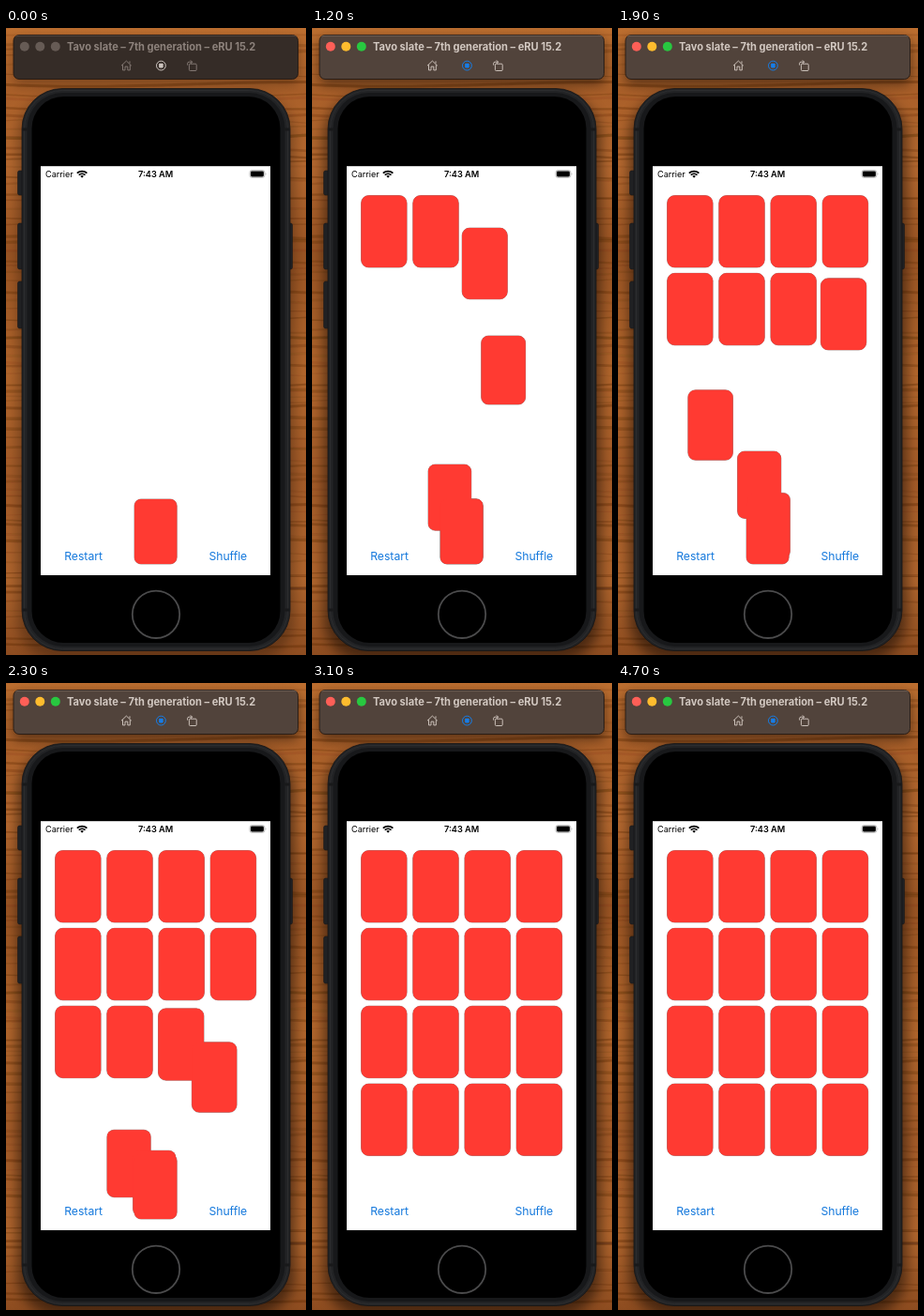
Animation, 320 px wide and 668 px high, one loop 4.8 s. Source, as an HTML page:

```html
<!DOCTYPE html>
<html lang="en">
<head>
<meta charset="utf-8">
<title>Card dealing</title>
<style>
  html, body { margin: 0; width: 100%; height: 100%; overflow: hidden; background: #a65d29; }
  svg { display: block; width: 100%; height: 100%; }
  text { font-family: Inter, "Liberation Sans", sans-serif; }
  #bar { --bg: #51433b; --edge: #776960; --ink: #d2c8c1; --icon: #d8cec7; --rec: #167de8;
         --red: #fe5f57; --amber: #febc2e; --green: #28c840; }
  #bar.idle { --bg: #352c27; --edge: #5c504a; --ink: #8d827c; --icon: #8c817b; --rec: #cdc5c0;
              --red: #665b55; --amber: #665b55; --green: #665b55; }
</style>
</head>
<body>
<svg viewBox="0 0 320 668" preserveAspectRatio="none">
  <defs>
    <linearGradient id="wood" x2="0" y2="1">
      <stop offset="0" stop-color="#bd6f30"/>
      <stop offset=".1" stop-color="#a95f29"/>
      <stop offset=".22" stop-color="#b4682f"/>
      <stop offset=".36" stop-color="#9a5423"/>
      <stop offset=".55" stop-color="#b2662c"/>
      <stop offset=".72" stop-color="#a45b28"/>
      <stop offset=".88" stop-color="#b0652d"/>
      <stop offset="1" stop-color="#8d4c20"/>
    </linearGradient>
    <filter id="blur" x="-20%" y="-20%" width="140%" height="140%"><feGaussianBlur stdDeviation="7"/></filter>
    <filter id="soft"><feGaussianBlur stdDeviation="1.2 .7"/></filter>
  </defs>

  <rect width="320" height="668" fill="url(#wood)"/>
  <g id="grain" fill="none" stroke="#5f2d0d" filter="url(#soft)"/>
  <g id="shade" filter="url(#blur)">
    <rect x="12" y="72" width="296" height="602" rx="44"/>
    <rect x="8" y="12" width="304" height="48" rx="6"/>
  </g>

  <!-- phone -->
  <g fill="#202123" stroke="#18191a" stroke-width=".6">
    <rect x="12.5" y="152" width="8" height="26" rx="2"/>
    <rect x="12.5" y="208" width="8" height="49" rx="2"/>
    <rect x="12.5" y="270" width="8" height="50" rx="2"/>
    <rect x="298" y="208" width="7.5" height="49" rx="2"/>
  </g>
  <rect x="17" y="64.5" width="286" height="599" rx="43" fill="#222325" stroke="#161617" stroke-width=".8"/>
  <rect x="19.5" y="66.5" width="281" height="595" rx="41" fill="none" stroke="#2c2d2f"/>
  <rect x="22.5" y="69" width="275" height="590" rx="38" fill="#17181a"/>
  <rect x="27.5" y="73" width="265" height="582" rx="34"/>
  <path d="M17.5 108h5M297.5 108h5M17.5 620h5M297.5 620h5" stroke="#18191a" stroke-width="3"/>
  <circle cx="160" cy="624.8" r="25.2" fill="none" stroke="#4b4b4c" stroke-width="1.8"/>

  <!-- screen -->
  <rect x="37" y="147.2" width="245" height="435.8" fill="#fff"/>
  <text x="42" y="159" font-size="9.1">Carrier</text>
  <text x="159.6" y="159" font-size="9.2" font-weight="600" text-anchor="middle">7:43 AM</text>
  <g fill="none" stroke="#000" stroke-width="1.7">
    <path d="M75.8 154.7a7.6 7.6 0 0 1 10.6 0M77.7 156.7a4.9 4.9 0 0 1 6.8 0"/>
    <path d="M81.1 159.7l-1.8-1.9a2.6 2.6 0 0 1 3.6 0z" fill="#000" stroke="none"/>
  </g>
  <rect x="260" y="151.7" width="15.8" height="7.6" rx="2.2" fill="none" stroke="#999" stroke-width=".7"/>
  <rect x="260.9" y="152.6" width="14" height="5.8" rx="1.4"/>
  <path d="M276.8 154.2q1.4 1.3 0 2.6z" fill="#999"/>
  <g font-size="12.2" fill="#1478dc" text-anchor="middle">
    <text x="82.6" y="567.2">Restart</text>
    <text x="236.8" y="567.2">Shuffle</text>
  </g>
  <use href="#cards" stroke="#8a5f5e" stroke-width=".7"/>
  <g id="cards" fill="#ff3a32"></g>

  <!-- simulator bar -->
  <g id="bar">
    <rect x="8" y="7.5" width="303.5" height="47" rx="6" fill="var(--bg)" stroke="#1f1510" stroke-width=".8"/>
    <path d="M10 9.3q1-1 4-1H306q3 0 4 1" fill="none" stroke="var(--edge)" stroke-width=".8"/>
    <circle cx="19.8" cy="19.8" r="5" fill="var(--red)"/>
    <circle cx="36.3" cy="19.8" r="5" fill="var(--amber)"/>
    <circle cx="52.8" cy="19.8" r="5" fill="var(--green)"/>
    <text x="65" y="23.5" font-size="11.05" font-weight="700" fill="var(--ink)">Tavo slate – 7th generation – eRU 15.2</text>
    <g fill="none" stroke="var(--icon)" stroke-width=".9">
      <path d="M123 40.2l5.4-5.1 5.4 5.1M124.5 39.2v5.7h2.5v-3.8h2.8v3.8h2.5v-5.7M132 37.6v-2.2"/>
      <path d="M196.4 38.2h5.8q1 0 1 1v5.3q0 1-1 1h-5.8q-1 0-1-1v-5.3q0-1 1-1zM193.6 39.6v-1.8q0-1.6 1.6-1.6h3.4M196.8 34.4l1.8 1.8-1.8 1.8"/>
    </g>
    <circle cx="165.4" cy="40.1" r="4.9" fill="none" stroke="var(--rec)"/>
    <rect x="163.1" y="37.8" width="4.6" height="4.6" rx=".8" fill="var(--rec)"/>
  </g>
</svg>

<script>
const LOOP = 4800, START = 565, STEP = 125, FLIGHT = 500, COUNT = 16;
const DECK = { x: 137, y: 502, width: 45.2, height: 69, rx: 7 };
const $ = id => document.getElementById(id);
const clamp = v => Math.min(1, Math.max(0, v));

function add(parent, tag, attrs) {
  const el = document.createElementNS("http://www.w3.org/2000/svg", tag);
  for (const k in attrs) el.setAttribute(k, attrs[k]);
  return parent.appendChild(el);
}

// Cubic bezier (.42, 0, .58, 1)
function ease(x) {
  let lo = 0, hi = 1, s = .5;
  for (let i = 0; i < 22; i++) {
    s = (lo + hi) / 2;
    const r = 1 - s;
    if (1.26 * s * r * r + 1.74 * s * s * r + s ** 3 < x) lo = s; else hi = s;
  }
  return s * s * (3 - 2 * s);
}

let seed = 11;
const rand = () => (seed = seed * 16807 % 2147483647) / 2147483647;

for (let y = 0; y < 668; y += 4 + rand() * 9) {
  const b = y + rand() * 14 - 7, c = y + rand() * 14 - 7;
  add($("grain"), "path", {
    d: `M-5 ${y}C110 ${b} 210 ${c} 325 ${y + rand() * 8 - 4}`,
    "stroke-width": 1 + rand() * 2.5,
    opacity: .08 + rand() * .3
  });
}

const cards = Array.from({ length: COUNT }, (_, i) => ({
  el: add($("cards"), "rect", DECK),
  goal: { x: 52.5 + i % 4 * 55.2, y: 178.5 + (i >> 2) * 82.85, width: 48.6, height: 76.5, rx: 8 }
}));

function draw(t) {
  const idle = t < 100;
  $("bar").setAttribute("class", idle ? "idle" : "");
  $("shade").setAttribute("opacity", idle ? .3 : .5);
  // the deal runs slightly late in its second half
  const clock = t - START - 32 * clamp((t - 1600) / 700);
  cards.forEach(({ el, goal }, i) => {
    const p = ease(clamp((clock - i * STEP) / FLIGHT));
    for (const k in goal) el.setAttribute(k, DECK[k] + (goal[k] - DECK[k]) * p);
    // one waiting card stands for the whole deck, keeping its edge smooth
    const waiting = clock < i * STEP && i < COUNT - 1;
    el.setAttribute("visibility", waiting ? "hidden" : "visible");
  });
}

const origin = performance.now();
function frame() {
  draw((performance.now() - origin) % LOOP);
  requestAnimationFrame(frame);
}
frame();
</script>
</body>
</html>
```
